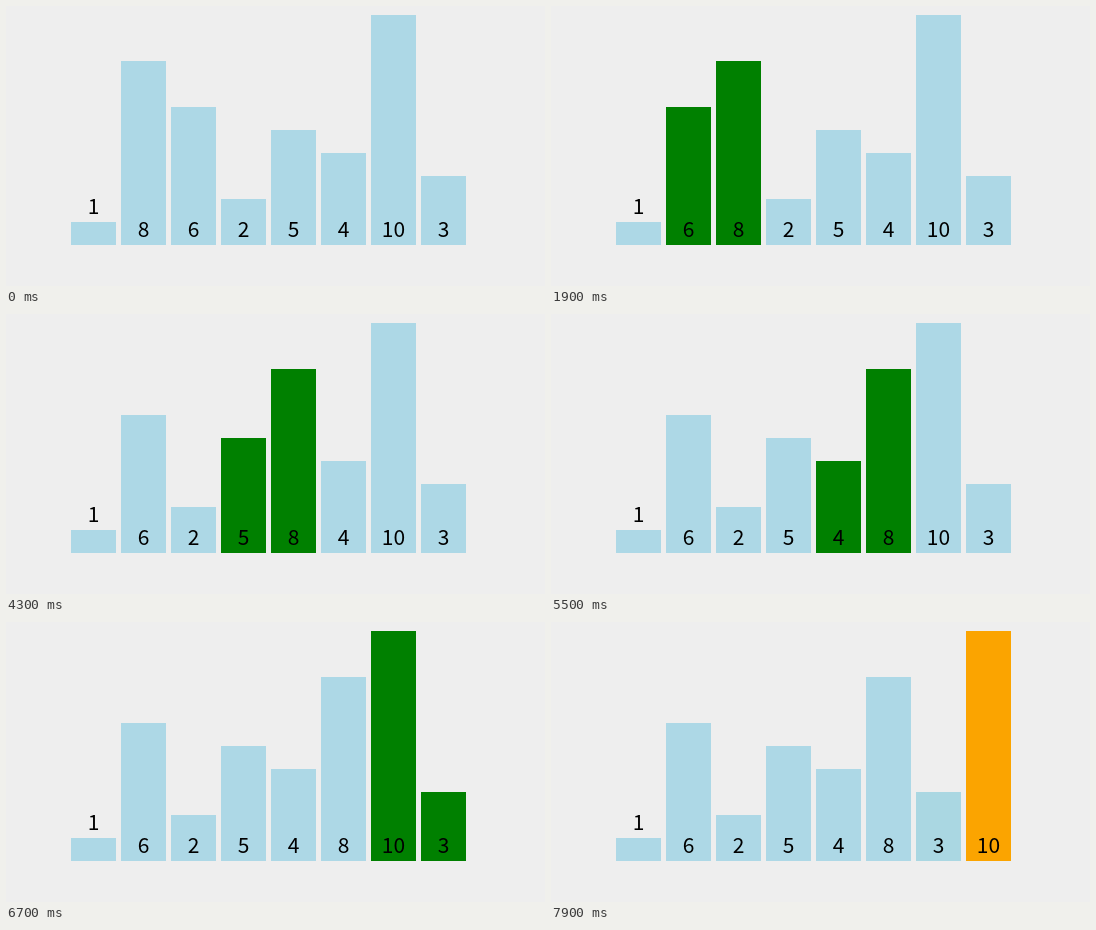
An HTML page that plays this animation: 539 by 280 pixels, repeating every 8 s.

```html
<!DOCTYPE html>
<html lang="en">
<head>
<meta charset="utf-8">
<title>Bubble sort pass</title>
<style>
  html, body { margin: 0; width: 100%; height: 100%; overflow: hidden; background: #eee; }
  svg { display: block; }
  text { font: 21px "Noto Sans CJK SC", "Noto Sans CJK JP", "Noto Sans", sans-serif; text-anchor: middle; }
</style>
</head>
<body>
<svg id="stage" width="539" height="280" viewBox="0 0 539 280"></svg>
<script>
const LOOP = 8000, TICK = 100, FADE = 250;
const LEFT = 65, STEP = 50, WIDTH = 45, UNIT = 23, BASE = 239;
const IDLE = [173, 216, 230], ACTIVE = [0, 128, 0], DONE = [255, 165, 0];
const values = [1, 8, 6, 2, 5, 4, 10, 3];

// [start time, action, left slot]
const script = [
  [395, "compare", 0],
  [995, "compare", 1], [1570, "swap", 1],
  [2195, "compare", 2], [2810, "swap", 2],
  [3395, "compare", 3], [4010, "swap", 3],
  [4595, "compare", 4], [5210, "swap", 4],
  [5795, "compare", 5],
  [6430, "compare", 6], [7010, "swap", 6],
  [7690, "finish", 7]
];

const stage = document.getElementById("stage");
const add = (parent, name, attrs) => {
  const node = document.createElementNS("http://www.w3.org/2000/svg", name);
  for (const key in attrs) node.setAttribute(key, attrs[key]);
  return parent.appendChild(node);
};

const bars = values.map(value => {
  const group = add(stage, "g", {});
  const height = value * UNIT;
  const rect = add(group, "rect", { y: BASE - height, width: WIDTH, height });
  const y = value === 1 ? BASE - height - 8 : BASE - 8;
  add(group, "text", { x: WIDTH / 2, y }).textContent = value;
  return { group, rect };
});

// Each state lists slot and colour per bar, eased into from the state before.
function buildStates() {
  const order = values.map((_, i) => i);
  let state = order.map(i => ({ x: LEFT + STEP * i, color: IDLE }));
  const states = [{ start: -FADE, bars: state }];
  for (const [start, action, slot] of script) {
    if (action === "swap") {
      [order[slot], order[slot + 1]] = [order[slot + 1], order[slot]];
    }
    state = state.map((_, bar) => {
      const at = order.indexOf(bar);
      const lit = at === slot || at === slot + 1;
      const color = !lit ? IDLE : action === "finish" ? DONE : ACTIVE;
      return { x: LEFT + STEP * at, color };
    });
    states.push({ start, bars: state });
  }
  return states;
}

const states = buildStates();
const mix = (a, b, k) => a + (b - a) * k;
const ease = t => t < 0.5 ? 4 * t ** 3 : 1 - 4 * (1 - t) ** 3;

function draw(time) {
  let n = states.length - 1;
  while (n > 0 && states[n].start > time) n--;
  const to = states[n], from = states[Math.max(0, n - 1)];
  const k = ease(Math.min(1, (time - to.start) / FADE));
  bars.forEach(({ group, rect }, i) => {
    const a = from.bars[i], b = to.bars[i];
    const color = a.color.map((c, j) => Math.round(mix(c, b.color[j], k)));
    group.setAttribute("transform", `translate(${mix(a.x, b.x, k)} 0)`);
    rect.setAttribute("fill", `rgb(${color})`);
  });
}

const begin = performance.now();
function frame() {
  const time = (performance.now() - begin) % LOOP;
  draw(Math.floor(time / TICK) * TICK);
  requestAnimationFrame(frame);
}
frame();
</script>
</body>
</html>
```
